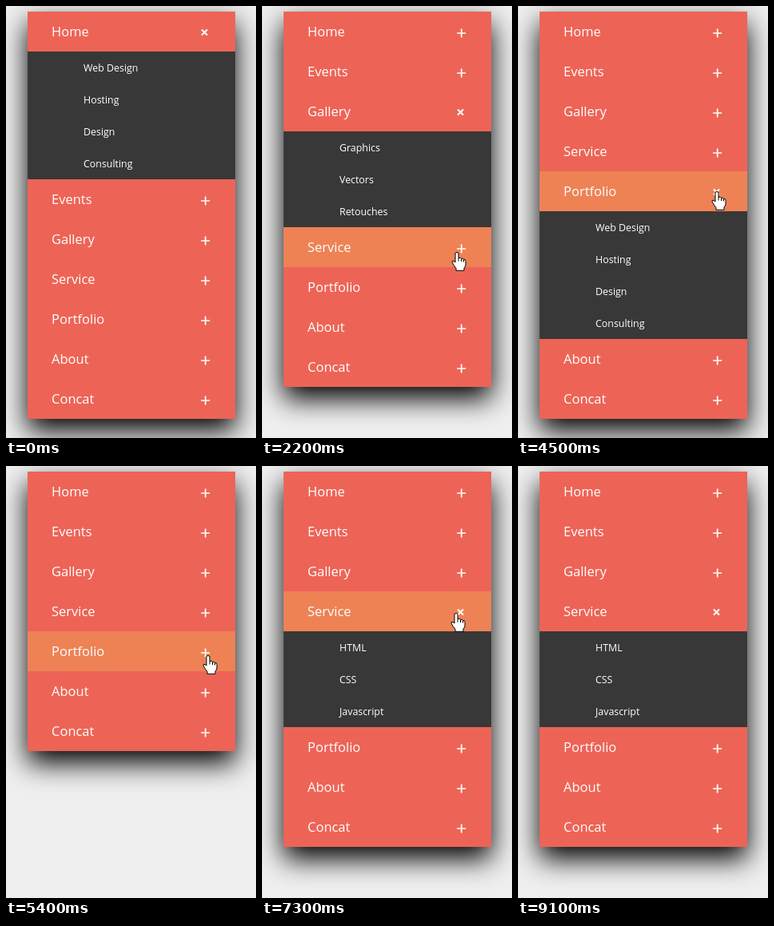
These frames come from a looping animation (313 px wide and 541 px high, 9500 ms). An HTML page with a canvas:

```html
<!DOCTYPE html>
<html lang="en">
<head>
<meta charset="utf-8">
<title>Accordion menu</title>
<style>
  html, body { margin: 0; width: 100%; height: 100%; overflow: hidden; background: #efefef; }
  canvas { display: block; }
</style>
</head>
<body>
<canvas id="stage" width="313" height="541"></canvas>
<script>
const ctx = document.getElementById('stage').getContext('2d');
const LOOP = 9500, STEP = 100;
const LEFT = 27, TOP = 7, WIDTH = 260, ROW = 50, SUB_ROW = 40;
const RED = '#ed6456', ORANGE = '#ee8255', DARK = '#383838';
const FONT = '"Open Sans", "Noto Sans", sans-serif';

const services = ['Web Design', 'Hosting', 'Design', 'Consulting'];
const menu = [
  { label: 'Home', items: services },
  { label: 'Events', items: ['Click', 'Mouseover', 'Mouseout', 'Dbclick'] },
  { label: 'Gallery', items: ['Graphics', 'Vectors', 'Retouches'] },
  { label: 'Service', items: ['HTML', 'CSS', 'Javascript'] },
  { label: 'Portfolio', items: services },
  { label: 'About', items: [] },
  { label: 'Concat', items: [] }
];

// start time, open section (-1: none), slide duration
const toggles = [
  [0, 0, STEP], [1300, 1, STEP], [2200, 2, STEP], [2600, 4, 500], [4700, -1, 400],
  [6000, 4, STEP], [6900, 3, 400], [8200, -1, STEP], [8900, 3, STEP]
];

// time, tip x, tip y, pointer shape
const cursorKeys = [
  [200, 289, 40, 'arrow'], [300, 276, 34, 'hand'], [400, 266, 75, 'arrow'],
  [700, 249, 235, 'hand'], [900, 249, 254, 'hand'], [1200, 249, 254, 'hand'],
  [1300, 249, 247, 'arrow'], [1500, 249, 275, 'hand'], [1900, 250, 295, 'hand'],
  [2100, 250, 295, 'hand'], [2200, 244, 308, 'hand'], [2500, 247, 355, 'hand'],
  [2800, 247, 355, 'arrow'], [3200, 247, 355, 'arrow'], [3500, 257, 252, 'arrow'],
  [3600, 254, 245, 'hand'], [4000, 250, 234, 'hand'], [4200, 250, 234, 'hand'],
  [4500, 249, 232, 'hand'], [4700, 249, 232, 'hand'], [5400, 253, 237, 'hand'],
  [5600, 250, 236, 'hand'], [5800, 249, 235, 'hand'], [6100, 249, 235, 'hand'],
  [6700, 247, 182, 'hand'], [6900, 247, 182, 'hand'], [7300, 243, 184, 'hand'],
  [7700, 247, 181, 'hand'], [7800, 247, 181, 'hand'], [7900, 249, 182, 'hand'],
  [8400, 249, 182, 'hand'], [8500, 249, 183, 'hand'], [8900, 249, 183, 'hand'],
  [9000, 290, 172, 'arrow'], [9100, 320, 165, 'arrow']
];

const pointers = {
  arrow: new Path2D('M.5 .5V16L4 12.7L6.5 18.5L9 17.5L6.6 11.8H11.3Z'),
  hand: new Path2D('M-2 13V2Q-2 .5 0 .5Q2 .5 2 2V7.5Q5 6.5 5.5 8.5Q8 7.5 8.5 9.5' +
    'Q11 9 11 11.5V16Q11 18 9 20V23.3H-1V20.5Q-4 17 -6 13Q-6.3 10.5 -4 11.5Z' +
    'M2 7.5V11.5M5.5 8.5V12M8.5 9.5V12.5')
};

const lerp = (a, b, p) => a + (b - a) * p;
const swing = p => 0.5 - Math.cos(Math.PI * p) / 2;

function layout(time) {
  const index = toggles.findLastIndex(([start]) => start <= time);
  const [start, open, duration] = toggles[index];
  const previous = index ? toggles[index - 1][1] : -1;
  const progress = swing(Math.min(1, (time - start + STEP) / duration));
  let y = TOP;
  const rows = menu.map((section, i) => {
    const share = lerp(+(i === previous), +(i === open), progress);
    const row = { ...section, y, open: i === open, height: Math.round(section.items.length * SUB_ROW * share) };
    y += ROW + row.height;
    return row;
  });
  return { rows, bottom: y };
}

function cursorAt(time) {
  const index = cursorKeys.findLastIndex(([start]) => start <= time);
  const from = cursorKeys[index], to = cursorKeys[index + 1];
  if (!from || !to) return null;
  const p = (time - from[0]) / (to[0] - from[0]);
  return {
    x: Math.round(lerp(from[1], to[1], p)),
    y: Math.round(lerp(from[2], to[2], p)),
    shape: from[3]
  };
}

function line(x1, y1, x2, y2) {
  ctx.moveTo(x1, y1);
  ctx.lineTo(x2, y2);
}

function drawIcon(y, open) {
  ctx.beginPath();
  ctx.strokeStyle = '#fff';
  if (open) {
    ctx.lineWidth = 2;
    line(245, y + 22.5, 252, y + 29.5);
    line(252, y + 22.5, 245, y + 29.5);
  } else {
    ctx.lineWidth = 1.7;
    line(244.2, y + 27, 255.2, y + 27);
    line(249.7, y + 21.5, 249.7, y + 32.5);
  }
  ctx.stroke();
}

function drawSubmenu({ y, height, items }) {
  const top = y + ROW;
  ctx.save();
  ctx.beginPath();
  ctx.rect(LEFT, top, WIDTH, height);
  ctx.clip();
  ctx.fillStyle = DARK;
  ctx.fillRect(LEFT, top, WIDTH, height);
  ctx.fillStyle = '#fff';
  ctx.font = '500 12.4px ' + FONT;
  items.forEach((item, i) => ctx.fillText(item, 97, top + i * SUB_ROW + 25));
  ctx.restore();
}

function drawRow(row, cursor) {
  const hovered = cursor && cursor.x >= LEFT && cursor.x < LEFT + WIDTH &&
    cursor.y >= row.y && cursor.y < row.y + ROW;
  if (hovered) {
    ctx.fillStyle = ORANGE;
    ctx.fillRect(LEFT, row.y, WIDTH, ROW);
  }
  ctx.fillStyle = '#fff';
  ctx.font = '16.5px ' + FONT;
  ctx.fillText(row.label, 57, row.y + 31);
  drawIcon(row.y, row.open);
  if (row.height) drawSubmenu(row);
}

function drawCursor({ x, y, shape }) {
  ctx.save();
  ctx.translate(x, y);
  ctx.fillStyle = '#fff';
  ctx.strokeStyle = '#000';
  ctx.lineWidth = 1;
  ctx.fill(pointers[shape]);
  ctx.stroke(pointers[shape]);
  ctx.restore();
}

function draw(time) {
  const { rows, bottom } = layout(time);
  const cursor = cursorAt(time);
  ctx.fillStyle = '#efefef';
  ctx.fillRect(0, 0, 313, 541);
  ctx.save();
  ctx.shadowColor = '#000';
  ctx.shadowBlur = 32;
  ctx.shadowOffsetY = 15;
  ctx.fillStyle = RED;
  ctx.fillRect(LEFT, TOP, WIDTH, bottom - TOP);
  ctx.restore();
  rows.forEach(row => drawRow(row, cursor));
  if (cursor) drawCursor(cursor);
}

function tick() {
  draw(Math.floor(performance.now() % LOOP / STEP) * STEP);
  requestAnimationFrame(tick);
}
tick();
</script>
</body>
</html>
```
